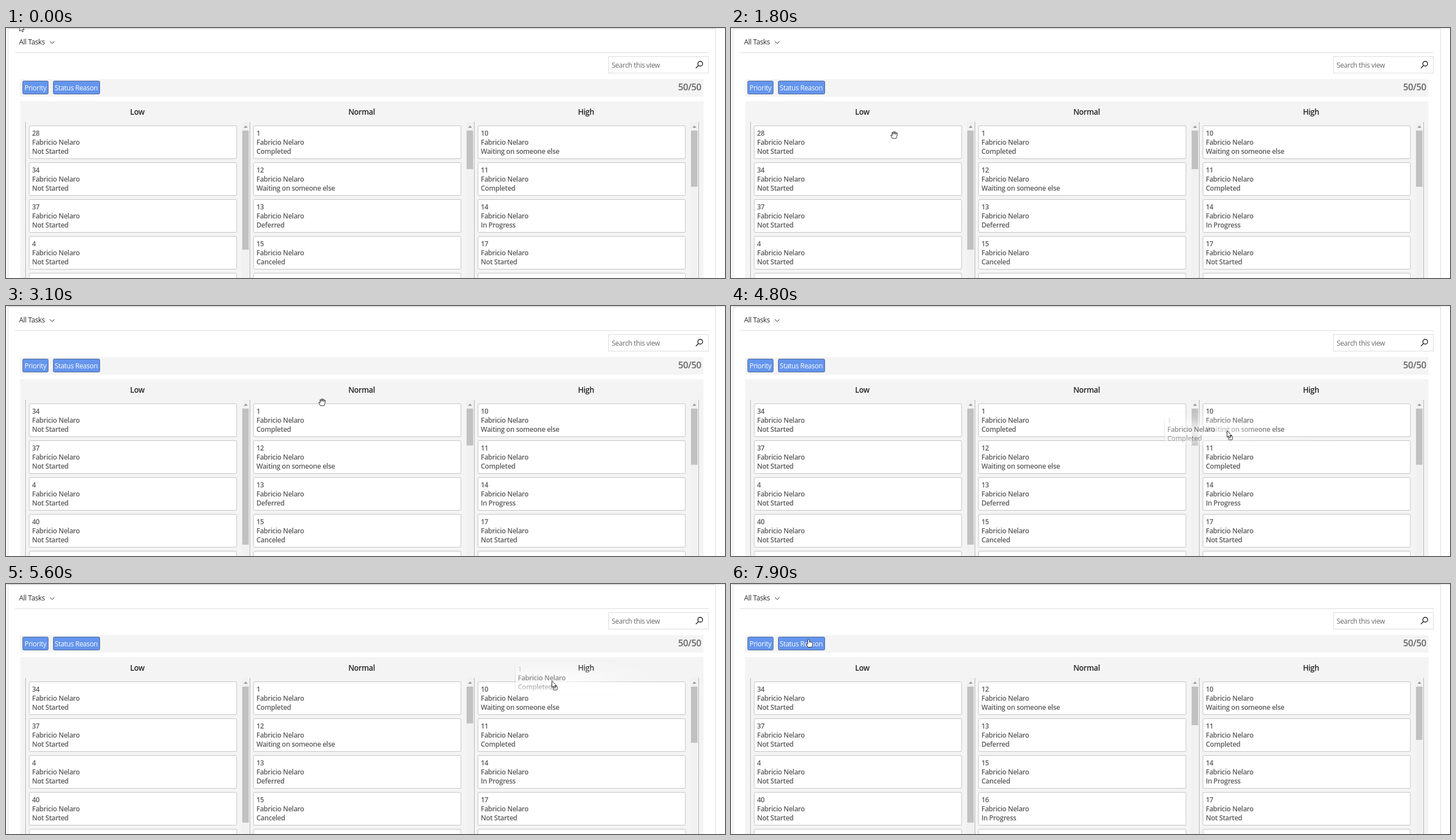
An HTML page that plays this animation: 1269x441 px, repeating every 8 s.

```html
<!DOCTYPE html>
<html lang="en">
<head>
<meta charset="utf-8">
<title>Task board</title>
<style>
html, body { margin: 0; width: 100%; height: 100%; overflow: hidden; background: #fff; }
svg { display: block; width: 100vw; height: 100vh; }
text { font: 400 12.1px "Open Sans", "Noto Sans", sans-serif; letter-spacing: -.025em; fill: #666; }
.card text { font-weight: 600; fill: #5c5c5c; }
.card rect { fill: #fff; stroke: #c3c3c3; }
.head { font-size: 13.5px; font-weight: 600; fill: #222; text-anchor: middle; }
.title { font-size: 12.4px; font-weight: 500; fill: #2b2b2b; }
.count { font-size: 16px; font-weight: 600; text-anchor: end; }
.chip rect { fill: #6495ed; stroke: #54699a; }
.chip text { fill: #fff; text-anchor: middle; }
.line { fill: none; stroke: #dcdcdc; }
.ink { fill: none; stroke: #222; }
#cursor path, #cursor rect { fill: #fff; stroke: #222; stroke-width: .95; stroke-linejoin: round; }
</style>
</head>
<body>
<svg id="stage" viewBox="0 0 1269 441" preserveAspectRatio="none">
  <defs>
    <radialGradient id="fade">
      <stop offset="0" stop-color="#fff" stop-opacity=".75"/>
      <stop offset=".12" stop-color="#fff" stop-opacity=".7"/>
      <stop offset=".3" stop-color="#fff" stop-opacity=".4"/>
      <stop offset=".5" stop-color="#fff" stop-opacity=".12"/>
      <stop offset="1" stop-color="#fff" stop-opacity="0"/>
    </radialGradient>
    <mask id="veil" maskUnits="userSpaceOnUse" x="-5" y="-5" width="380" height="70">
      <ellipse id="spot" cy="33" rx="300" ry="50" fill="url(#fade)"/>
    </mask>
  </defs>
  <rect width="1269" height="441" fill="#fff"/>
  <path class="line" d="M0 .5H1269M3.5 441V1.5H1252.5V441M16 43.5H1240"/>
  <text class="title" x="23" y="28.5">All Tasks</text>
  <path class="ink" d="M77.5 23.5l4 4 4-4"/>
  <rect class="line" x="1063.5" y="50.5" width="176" height="29"/>
  <text x="1069" y="70.3">Search this view</text>
  <g class="ink" stroke-width="1.4"><circle cx="1225.3" cy="63" r="4.2"/><path d="M1222.2 66.2L1217.6 70.8"/></g>
  <rect x="25" y="90" width="1206" height="31" fill="#f4f4f4"/>
  <rect x="25" y="129" width="1206" height="312" fill="#f4f4f4"/>
  <g class="chip"><rect x="29.5" y="93.5" width="45" height="23" rx="2"/><text x="52" y="110">Priority</text></g>
  <g class="chip"><rect x="83.5" y="93.5" width="82" height="23" rx="2"/><text x="124" y="110">Status Reason</text></g>
  <text class="count" x="1227" y="110">50/50</text>
  <g id="board"></g>
  <g id="ghost" mask="url(#veil)"></g>
  <g id="cursor"></g>
</svg>
<script>
const LOOP = 8000, STEP = 100, ROWS = 5, PITCH = 65, COL = 396;
const OWNER = "Fabricio Nelaro";
const $ = id => document.getElementById(id);

function add(parent, tag, attrs = {}, text = "") {
  const el = document.createElementNS("http://www.w3.org/2000/svg", tag);
  for (const k in attrs) el.setAttribute(k, attrs[k]);
  el.textContent = text;
  return parent.appendChild(el);
}

const NS = "Not Started", DONE = "Completed", WAIT = "Waiting on someone else", PROG = "In Progress";
const columns = [
  { name: "Low", tasks: [[28, NS], [34, NS], [37, NS], [4, NS], [40, NS]] },
  { name: "Normal", tasks: [[1, DONE], [12, WAIT], [13, "Deferred"], [15, "Canceled"], [16, PROG]] },
  { name: "High", tasks: [[10, WAIT], [11, DONE], [14, PROG], [17, NS]] }
];

function makeCard(parent, x, y) {
  const g = add(parent, "g", { class: "card", transform: `translate(${x} ${y})` });
  add(g, "rect", { x: .5, y: .5, width: 366, height: 58, rx: 2 });
  const lines = [18.3, 34.3, 50.3].map(ly => add(g, "text", { x: 5.5, y: ly }));
  return ([id, status] = ["", ""]) => {
    [id, id && OWNER, status].forEach((s, i) => lines[i].textContent = s);
  };
}

// Board columns with headings, cards and scrollbars
const dots = x => add($("board"), "path", { d: `M${x} 166V441`, stroke: "#777", "stroke-dasharray": "1 1" });
columns.forEach((col, i) => {
  const x = COL * i, board = $("board");
  add(board, "text", { class: "head", x: 231.7 + x, y: 153 }, col.name);
  dots(34.5 + x);
  add(board, "rect", { x: 416 + x, y: 166, width: 13, height: 275, fill: "#f1f1f1" });
  add(board, "path", { d: `M${419.5 + x} 176h7l-3.5-4z`, fill: "#999" });
  col.thumb = add(board, "rect", { x: 417 + x, y: 181, width: 11.5, fill: "#c1c1c1" });
  col.cards = Array.from({ length: ROWS }, (_, r) => makeCard(board, 40.5 + x, 172 + PITCH * r));
});
dots(34.5 + COL * 3);
const setGhost = makeCard($("ghost"), 0, 0);

const ARROW = "M0 0V11.5L2.7 9.2L4.6 13L6.6 12L4.8 8.6H8.3Z";
const shapes = {
  arrow: g => add(g, "path", { d: ARROW }),
  drag: g => {
    add(g, "rect", { x: 2.5, y: 9.5, width: 7, height: 6.5, rx: 1 });
    add(g, "path", { d: ARROW });
  },
  hand: g => add(g, "path", { d: "M-3.2 12.8L-5.8 8.2Q-6.4 6.6-5 6.6L-3.4 8.2L-4 2.6Q-3.4 1.2-2.4 2.4L-1.6 5.4V1Q-.6-.2 .4 1L.7 5.2L1.6 1.4Q2.6 .6 3.2 1.8L3 5.6L4.4 3.2Q5.6 2.8 5.8 4L4.6 9.4L3.4 12.8Z" }),
  point: g => add(g, "path", { d: "M-1.4 1.2Q0-.6 1.4 1.2V5.4Q2.6 4.6 3.4 5.8Q4.8 5.2 5.4 6.4Q7 6 7 7.6V10.5L5.6 14.6H-.8L-4 9.6Q-4.4 7.6-2.8 8L-1.4 9.4Z" })
};
for (const k in shapes) {
  const g = add($("cursor"), "g");
  shapes[k](g);
  shapes[k] = g;
}

// Time, x, y
const cursorPath = [
  [400, 24, -6], [1000, 350, 86], [1100, 350, 86], [1400, 267, 185], [1700, 267, 185],
  [1800, 288, 182], [2400, 558, 163], [4000, 558, 163], [4200, 517, 206], [4600, 517, 206],
  [4700, 680, 214], [4800, 875.5, 220], [5000, 955, 198], [5500, 967, 172], [5600, 963.5, 171],
  [5800, 968, 172], [6200, 968, 172], [6400, 858, 170], [6500, 858, 170], [6600, 827.5, 174.5],
  [7400, 237, 118], [7900, 137, 97]
];
// The second dragged card trails behind the cursor
const ghostPath = [
  [4700, 580, 180], [4800, 764.5, 188], [5000, 885, 164], [5500, 897, 139], [5600, 898, 135.5], [5800, 900, 136]
];
const cursorKind = [
  [0, "arrow"], [1400, "hand"], [1900, "drag"], [2600, "hand"], [4400, "drag"], [6000, "arrow"]
];
const thumbs = [[0, 210, 68, 99], [3000, 240, 68, 99], [3100, 240, 65, 99], [6300, 240, 68, 99], [6400, 240, 68, 94]];

const latest = (list, t) => list.filter(k => k[0] <= t).pop();
const smooth = u => u * u * (3 - 2 * u);

function along(path, t) {
  const i = path.findIndex(k => k[0] > t);
  if (i < 0) return path[path.length - 1].slice(1);
  if (i === 0) return path[0].slice(1);
  const a = path[i - 1], b = path[i], u = smooth((t - a[0]) / (b[0] - a[0]));
  return [1, 2].map(n => a[n] + (b[n] - a[n]) * u);
}

const place = (el, x, y) => el.setAttribute("transform", `translate(${x.toFixed(2)} ${y.toFixed(2)})`);

function draw(t) {
  const [x, y] = along(cursorPath, t);
  const overChip = t > 7400 && x < 165 && y < 117;
  const kind = overChip ? "point" : latest(cursorKind, t)[1];
  for (const k in shapes) shapes[k].style.display = k === kind ? "" : "none";
  place($("cursor"), x, y);

  const first = t >= 1900 && t < 2600, second = t >= 4700 && t < 6000;
  $("ghost").style.display = first || second ? "" : "none";
  if (first) place($("ghost"), x - 247, y - 10);
  if (second) place($("ghost"), ...along(ghostPath, t));
  $("spot").setAttribute("cx", first ? 247 : 55);
  setGhost(columns[second ? 1 : 0].tasks[0]);

  const removed = [t >= 3000, t >= 6300, false];
  const sizes = latest(thumbs, t);
  columns.forEach((col, i) => {
    col.thumb.setAttribute("height", sizes[i + 1]);
    col.cards.forEach((set, r) => set(col.tasks[r + (removed[i] ? 1 : 0)]));
  });
}

let shown = -1;
function tick() {
  const t = Math.floor(performance.now() % LOOP / STEP) * STEP;
  if (t !== shown) draw(shown = t);
  requestAnimationFrame(tick);
}
tick();
</script>
</body>
</html>
```
